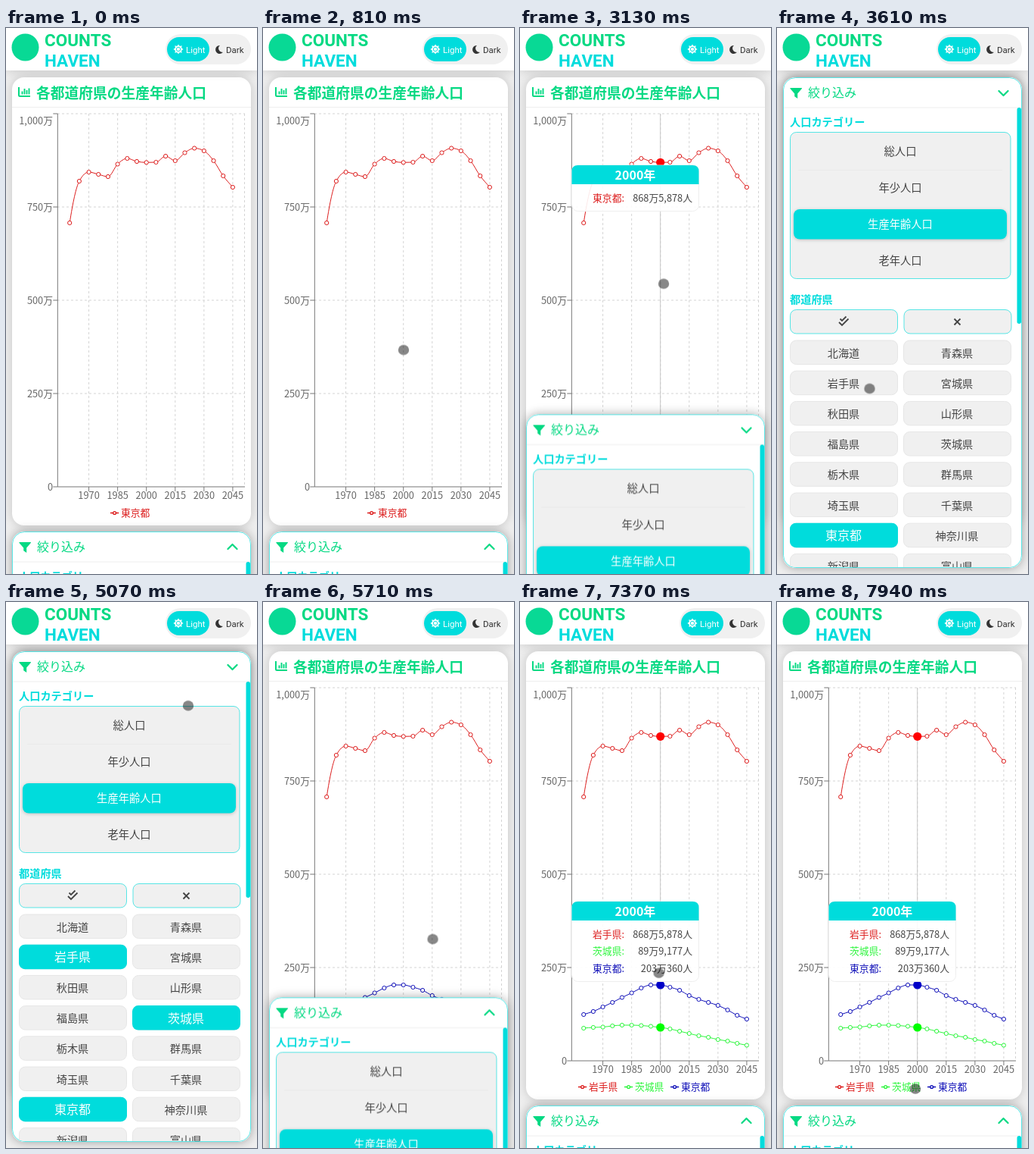
These frames come from a looping animation (332x720 px, 8000 ms). An HTML page:

```html
<!DOCTYPE html>
<html lang="ja">
<head>
<meta charset="utf-8">
<title>Population chart</title>
<style>
html, body { margin: 0; width: 100%; height: 100%; overflow: hidden; background: #efefef; }
svg { display: block; width: 332px; height: 720px; }
text { font-family: "Noto Sans CJK JP", "Noto Sans CJK", "Noto Sans", sans-serif; }
.latin { font-family: Roboto, sans-serif; }
.shadow { filter: drop-shadow(0 0 7px rgba(0, 0, 0, .18)); }
.deep { filter: drop-shadow(0 0 7px rgba(0, 0, 0, .34)); }
.anim { animation: 8s linear infinite; }
.step { animation: 8s step-end infinite; }
#touch { animation-name: touch; }
#panel { animation-name: panel; }
.closed { animation-name: closed; }
.opened { animation-name: opened; }
.before { animation-name: before; }
.after { animation-name: after; }
.tip1 { animation-name: tip1; }
.tip2 { animation-name: tip2; }
.pick1 { animation-name: pick1; }
.pick2 { animation-name: pick2; }

@keyframes touch {
  0%, 4.625% { transform: translate(190px, 735px); }
  14.125% { transform: translate(183px, 200px); }
  21%, 23.25% { transform: translate(182px, 173.5px); }
  32.9% { transform: translate(180px, 668px); }
  35.25%, 37.4% { transform: translate(180px, 673px); }
  39.125% { transform: translate(190px, 337.5px); }
  41.25% { transform: translate(192px, 300px); }
  45.125% { transform: translate(122.5px, 475.5px); }
  47.75%, 50% { transform: translate(120.5px, 476px); }
  56.25%, 60% { transform: translate(238px, 548px); }
  63.375% { transform: translate(241px, 137px); }
  65.6%, 67.5% { transform: translate(238px, 85px); }
  70% { transform: translate(225px, 440px); }
  82.625% { transform: translate(221px, 481px); }
  87.5%, 89.4% { transform: translate(184px, 385px); }
  96.1% { transform: translate(183px, 640px); }
  99.25%, 100% { transform: translate(183px, 642px); }
}
@keyframes panel {
  0%, 74.75%, 100% { transform: translateY(664px); }
  37.99% { transform: translateY(664px); animation-timing-function: ease; }
  44.24% { transform: translateY(65px); }
  68.5% { transform: translateY(65px); animation-timing-function: ease; }
}
@keyframes closed { 0%, 68.5% { opacity: 1; } 37.99% { opacity: 0; } }
@keyframes opened { 0%, 68.5% { opacity: 0; } 37.99% { opacity: 1; } }
@keyframes before { 0% { opacity: 1; } 56% { opacity: 0; } }
@keyframes after { 0% { opacity: 0; } 56%, 100% { opacity: 1; } }
@keyframes tip1 { 0%, 50% { opacity: 0; } 23.25% { opacity: 1; } }
@keyframes tip2 { 0% { opacity: 0; } 88.5%, 100% { opacity: 1; } }
@keyframes pick1 { 0% { opacity: 0; } 50.25%, 100% { opacity: 1; } }
@keyframes pick2 { 0% { opacity: 0; } 58.1%, 100% { opacity: 1; } }
</style>
</head>
<body>
<svg id="stage" viewBox="0 0 332 720"></svg>
<script>
const CYAN = '#00dcdc', GREEN = '#05d983', GREY = '#f0f0f0', INK = '#444';
const RED = '#dc1c1c', LIME = '#2cf53c', BLUE = '#1010b8';

// y is the optical middle of the text
const text = (x, y, s, size, fill = INK, weight = 400, anchor = 'middle') =>
  `<text x="${x}" y="${y + size * .37}" font-size="${size}" fill="${fill}" font-weight="${weight}" text-anchor="${anchor}">${s}</text>`;
const latin = (x, y, s, size, fill, weight) =>
  `<text class="latin" x="${x}" y="${y}" font-size="${size}" fill="${fill}" font-weight="${weight}">${s}</text>`;
const box = (x, y, w, h, r, fill, more = '') =>
  `<rect x="${x}" y="${y}" width="${w}" height="${h}" rx="${r}" fill="${fill}" ${more}/>`;
const path = (d, stroke, width = 1, more = '') =>
  `<path d="${d}" fill="none" stroke="${stroke}" stroke-width="${width}" ${more}/>`;
const dot = (x, y, r, fill, more = '') => `<circle cx="${x}" cy="${y}" r="${r}" fill="${fill}" ${more}/>`;
const step = (name, s) => `<g class="step ${name}">${s}</g>`;

const px = i => 84.2 + 12.69 * i;
const series = {
  red: [257, 202, 190, 193, 196, 179.5, 172, 176, 177.3, 177, 169, 175, 164.5, 158.5, 162, 175, 195, 210],
  blue: [544, 540, 534, 528, 521.5, 515.5, 509, 505, 505, 508, 512, 519, 524, 528, 532, 538, 545, 550],
  green: [562, 561, 560.5, 559, 558, 558, 558.5, 559.5, 561, 563, 566, 569, 572, 574, 577, 579, 582, 584.5]
};

// monotone cubic through evenly spaced points
function curve(ys) {
  const d = ys.slice(1).map((y, i) => y - ys[i]);
  const m = ys.map((_, i) => {
    if (!i) return d[0] * 1.5 - d[1] * .1;
    if (i > d.length - 1) return d[i - 1];
    const a = d[i - 1], b = d[i];
    return (Math.sign(a) + Math.sign(b)) * Math.min(Math.abs(a), Math.abs(b), Math.abs(a + b) / 4);
  });
  return ys.reduce((s, y, i) => i
    ? `${s}C${px(i - 2 / 3)},${ys[i - 1] + m[i - 1] / 3} ${px(i - 1 / 3)},${y - m[i] / 3} ${px(i)},${y}`
    : `M${px(0)},${y}`, '');
}
const line = (ys, color) => path(curve(ys), color) +
  ys.map((y, i) => dot(px(i), y, 2.6, '#fff', `stroke="${color}"`)).join('');

const legend = (x, name, color) =>
  path(`M${x},639.5h3.6m4,0h3.6`, color, 1.5) + dot(x + 5.6, 639.5, 1.9, 'none', `stroke="${color}" stroke-width="1.4"`) +
  text(x + 14, 639.5, name, 12.8, color, 400, 'start');

function tooltip(y, rows) {
  const h = 38 + rows.length * 22.5;
  return box(68.5, y, 168, h, 8, '#fff', 'fill-opacity=".9" stroke="#eee"') +
    `<path d="M68.5,${y + 25}v-17q0,-8 8,-8h152q8,0 8,8v17z" fill="${CYAN}"/>` +
    text(152.5, y + 13.5, '2000年', 16, '#fff', 700) +
    rows.map(([name, value, color], i) =>
      text(138, y + 43 + i * 22.5, name + ':', 12.8, color, 400, 'end') +
      text(228, y + 43 + i * 22.5, value, 12.8, INK, 400, 'end')).join('');
}
const guide = path('M185.7,113V605', '#c8c8c8');

function header() {
  const rays = [...Array(8)].map((_, i) =>
    `<path d="M-1.7,-4 0,-6.6 1.7,-4z" fill="#fff" transform="translate(228 28) rotate(${i * 45})"/>`).join('');
  return box(0, 0, 332, 56, 0, '#fff', 'class="shadow"') +
    dot(25.5, 25.5, 18, '#08d995') +
    latin(51, 23.5, 'COUNTS', 22.5, GREEN, 700) + latin(51, 51, 'HAVEN', 22.5, CYAN, 700) +
    box(211, 8, 113, 40, 20, GREY) + box(213, 12, 56, 32, 16, CYAN) +
    rays + dot(228, 28, 4.6, '#fff') + dot(228, 28, 2.7, 'none', `stroke="${CYAN}" stroke-width=".9"`) +
    latin(238, 32.5, 'Light', 11.5, '#fff', 400) +
    `<path d="M283,23a5.5,5.5 0 1 0 4,8.8a5,5 0 0 1 -4,-8.8z" fill="#333"/>` +
    latin(291, 32.5, 'Dark', 11.5, '#333', 400);
}

function chart() {
  const xs = [2, 5, 8, 11, 14, 17].map(px);
  const ys = [113, 236, 359, 482];
  let s = box(8, 65, 316, 591, 16, '#fff', 'class="shadow"') +
    path('M17,78v10.5q0,1.5 1.5,1.5H32', GREEN, 2) + path('M21.5,83.5v4M24.5,80v7.5M27.5,82v5.5M30.5,79.5v8', GREEN, 1.9) +
    text(40, 86, '各都道府県の生産年齢人口', 18.75, GREEN, 700, 'start') + path('M8,104.5H324', '#eee') +
    path(ys.map(y => `M68,${y}H316`).join('') + [...xs, 315.5].map(x => `M${x},113V605`).join(''), '#d4d4d4', 1, 'stroke-dasharray="3 3"') +
    path('M68.3,113V605H316' + [...ys, 605].map(y => `M62.3,${y}h6`).join('') + xs.map(x => `M${x},605v6`).join(''), '#777');
  ['1,000万', '750万', '500万', '250万', '0'].forEach((v, i) => {
    s += text(62, i ? 113 + 123 * i : 122, v, 12.8, '#666', 400, 'end');
  });
  xs.forEach((x, i) => { s += text(x, 616.5, 1970 + 15 * i, 12.8, '#666'); });
  s += step('tip1', guide) + step('tip2', guide) + line(series.red, RED) +
    step('before', legend(138, '東京都', RED)) +
    step('after', line(series.green, LIME) + line(series.blue, BLUE) +
      legend(77, '岩手県', RED) + legend(138, '茨城県', LIME) + legend(199, '東京都', BLUE));
  const x = px(8), big = dot(x, series.red[8], 5.6, '#f00');
  return s +
    step('tip1', big + tooltip(181, [['東京都', '868万5,878人', RED]])) +
    step('tip2', big + dot(x, series.green[8], 5.6, '#0f0') + dot(x, series.blue[8], 5.6, '#0000c8') +
      tooltip(395, [['岩手県', '868万5,878人', RED], ['茨城県', '89万9,177人', LIME], ['東京都', '203万360人', BLUE]]));
}

function panel() {
  const chevron = d => path(d, GREEN, 2.2, 'stroke-linecap="round" stroke-linejoin="round"');
  const edge = `stroke="${CYAN}" stroke-opacity=".65"`;
  const base = box(8, 0, 316, 647, 16, '#fff', 'class="deep"') + box(8.5, .5, 315, 646, 16, '#fff', edge);
  let s = `<path d="M18,14h14.5q1,0 .3,1l-5.6,6.5v6.5l-4,-2.8v-3.7L17.5,15q-.6,-1 .5,-1z" fill="${GREEN}"/>` +
    text(41, 20.5, '絞り込み', 16, GREEN, 400, 'start') +
    step('closed', chevron('M293.5,23l6,-6l6,6')) + step('opened', chevron('M293.5,18l6,6l6,-6')) +
    path('M9,40H323', '#eee') + box(317.5, 40, 5.5, 285, 2.7, CYAN) +
    text(17, 59, '人口カテゴリー', 14.2, CYAN, 700, 'start') +
    box(17.5, 72.5, 291.5, 193, 8, GREY, edge) +
    path('M28,122.5H298', '#eaeaea') +
    box(22, 174, 282, 39.5, 8, CYAN, 'style="filter:drop-shadow(0 1px 2px #0003)"');
  ['総人口', '年少人口', '生産年齢人口', '老年人口'].forEach((name, i) => {
    s += text(163, 98 + 48 * i, name, 14.3, i === 2 ? '#fff' : INK, i === 2 ? 500 : 400);
  });
  s += text(17, 293, '都道府県', 14.2, CYAN, 700, 'start');
  for (const x of [17.5, 168]) s += box(x, 306.5, 142, 31.5, 8, GREY, edge);
  s += path('M82,323l4,4l8.5,-8.5M83.5,318.5l2.5,2.5l5.5,-5.5', INK, 1.8) +
    path('M234.5,318.5l8,8m0,-8l-8,8', INK, 1.9);
  const picks = { 岩手県: 'pick1', 茨城県: 'pick2', 東京都: 'on' };
  '北海道 青森県 岩手県 宮城県 秋田県 山形県 福島県 茨城県 栃木県 群馬県 埼玉県 千葉県 東京都 神奈川県 新潟県 富山県'
    .split(' ').forEach((name, i) => {
      const x = i % 2 ? 167.5 : 17.5, y = 347 + 40.2 * (i >> 1);
      s += box(x, y, 142, 31.5, 8, GREY, 'stroke="#e6e6e6"') + text(x + 70.5, y + 16.3, name, 14.2);
      if (picks[name]) s += step(picks[name],
        box(x - .5, y - .5, 143, 32.5, 8, CYAN) + text(x + 70.5, y + 16.3, name, 16, '#fff', 500));
    });
  return `<g id="panel" class="anim">${base}<g clip-path="url(#clip)">${s}</g></g>`;
}

document.getElementById('stage').innerHTML =
  `<defs><clipPath id="clip">${box(9, 1, 314, 645, 15, '#000')}</clipPath></defs>` +
  box(0, 0, 332, 720, 0, '#efefef') + chart() + panel() + header() +
  `<g id="touch" class="anim"><ellipse rx="7.2" ry="6.8" fill-opacity=".47"/></g>`;
</script>
</body>
</html>
```
